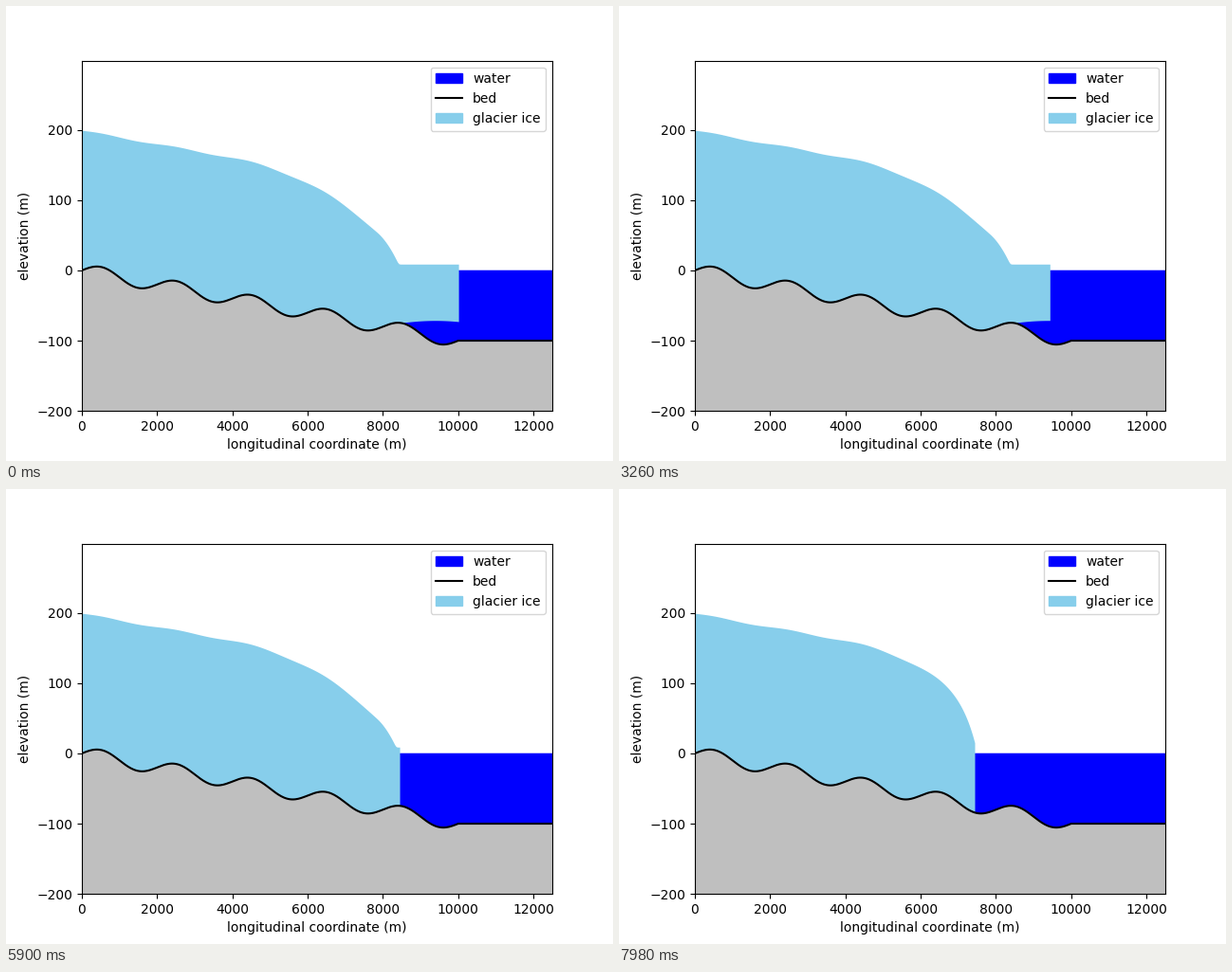
Write a matplotlib script that moves like this. It is 640x480 px and loops after 8 s.

```python
import numpy as np
import matplotlib.pyplot as plt
from matplotlib.animation import FuncAnimation
from matplotlib.patches import Patch, Polygon

STEP, LOOP = 20, 8000          # ms
LENGTH = 12500                 # m
SHELF = 8.3                    # freeboard of the floating tongue, m

# Calving events: time (s), front left behind (m), front speed after it (m/s)
EVENTS = [(0, 10020, 30), (.42, 9725, 30), (1.8, 9402, 30),
          (4.7, 8420, 30), (6.76, 7675, -187)]
COLLAPSE = EVENTS[-1][0]


def bed(x):
    return np.where(x < 10000, -x / 100 + 10 * np.sin(np.pi * x / 1000), -100.0)


def front(t):
    start, x, speed = [e for e in EVENTS if e[0] <= t][-1]
    return x + speed * (t - start)


def surface(x, t):
    km = x / 1000
    # gentle slope with ripples from the bed, steepening downstream and thinning
    z = 198.7 - 9.6 * km + 1.1 * np.sin(np.pi * km)
    drop = 1.75 * np.maximum(km - 3.5, 0) ** 2.5 + 51 * np.maximum(km - 7.85, 0) ** 2
    z -= drop * (1 + .012 * t)
    age = t - COLLAPSE
    if age >= 0:
        # the bare cliff slumps, reaching further inland with time
        reach = .15 + .15 * age
        slump = 55 * (1 - np.exp(-age / .4))
        z -= slump * np.exp((km - front(t) / 1000) / reach)
    # smooth lower limit: the ice shelf
    return SHELF + 1.5 * np.logaddexp(0, (z - SHELF) / 1.5)


def base(x):
    floating = -71.9 - 4.2 * (x / 1000 - 9.4) ** 2
    return np.where(x > 8400, np.maximum(bed(x), floating), bed(x))


def ice_outline(t):
    x = np.linspace(0, front(t), 260)
    top = np.column_stack([x, surface(x, t)])
    bottom = np.column_stack([x, base(x)])
    return np.vstack([top, bottom[::-1]])


fig, ax = plt.subplots(figsize=(6.4, 4.8), dpi=100)
xs = np.linspace(0, LENGTH, 501)
sea = np.linspace(7300, LENGTH, 261)

ax.fill_between(sea, bed(sea), 0, color="blue", zorder=1)
ice = Polygon(ice_outline(0), closed=True, facecolor="skyblue", linewidth=0,
              zorder=1.5)
ax.add_patch(ice)
ax.fill_between(xs, -200, bed(xs), color="0.75", zorder=1.8)
bed_line, = ax.plot(xs, bed(xs), color="black", zorder=2)

ax.set_xlim(0, LENGTH)
ax.set_ylim(-200, 298.5)
ax.set_xlabel("longitudinal coordinate (m)")
ax.set_ylabel("elevation (m)")
ax.legend([Patch(color="blue"), bed_line, Patch(color="skyblue")],
          ["water", "bed", "glacier ice"], loc="upper right")


def update(n):
    ice.set_xy(ice_outline(n * STEP / 1000))
    return [ice]


anim = FuncAnimation(fig, update, frames=LOOP // STEP, interval=STEP,
                     repeat=True, repeat_delay=0)
plt.show()
```
